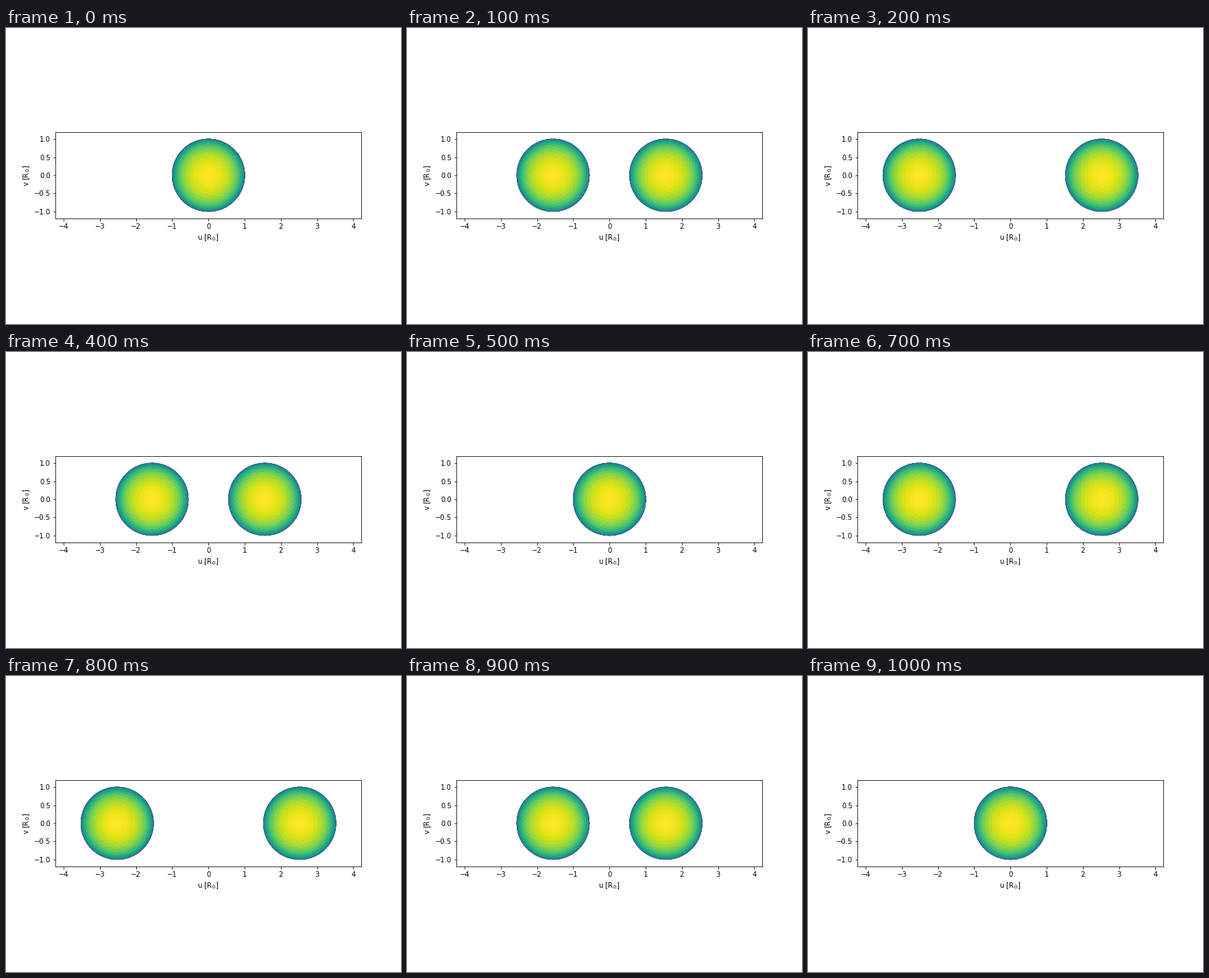
Animation of 576x432 px, one loop 1100 ms. Source, as a matplotlib script:

```python
import numpy as np
import matplotlib.pyplot as plt
from matplotlib.animation import FuncAnimation
from matplotlib.collections import PolyCollection

FRAMES = 11
ORBIT = 2.65   # distance of each star from the centre of mass
SPLIT = 9      # subdivisions per icosahedron edge


def icosahedron():
    """Faces of a unit icosahedron with its poles on the first axis."""
    def ring(height, shift):
        a = 2 * np.pi * (np.arange(5) + shift) / 5
        r = np.sqrt(1 - height**2)
        return np.column_stack([np.full(5, height), r * np.cos(a), r * np.sin(a)])

    h = 1 / np.sqrt(5)
    top, low = ring(h, 0), ring(-h, 0.5)
    north, south = np.array([1, 0, 0]), np.array([-1, 0, 0])
    faces = []
    for i in range(5):
        j = (i + 1) % 5
        faces += [(north, top[i], top[j]), (top[i], low[i], top[j]),
                  (low[i], low[j], top[j]), (south, low[j], low[i])]
    return faces


def sphere(n):
    tris = []
    for a, b, c in icosahedron():
        def point(i, j):
            p = a + (b - a) * i / n + (c - a) * j / n
            return p / np.linalg.norm(p)
        for i in range(n):
            for j in range(n - i):
                tris.append([point(i, j), point(i + 1, j), point(i, j + 1)])
                if i + j < n - 1:
                    tris.append([point(i + 1, j), point(i + 1, j + 1), point(i, j + 1)])
    return np.array(tris)


MESH = sphere(SPLIT)


def star(angle):
    """Mesh of one star, as (depth, u, v), turned with the orbit."""
    c, s = np.cos(angle), np.sin(angle)
    spin = np.array([[c, -s, 0], [s, c, 0], [0, 0, 1]])
    tris = MESH @ spin.T
    mid = tris.mean(axis=1)
    mu = mid[:, 0] / np.linalg.norm(mid, axis=1)
    light = 0.2 + 0.8 * np.clip(mu, 0, 1) ** 0.8   # limb darkening
    return tris + ORBIT * np.array([c, s, 0]), light


fig = plt.figure(figsize=(8, 6), dpi=72)
ax = fig.add_axes([0.125, 0.125, 0.775, 0.755])
ax.set_aspect("equal")
ax.set(xlim=(-4.228, 4.228), ylim=(-1.195, 1.195),
       xlabel=r"u [$\mathrm{R_{\odot}}$]", ylabel=r"v [$\mathrm{R_{\odot}}$]")
ax.set_xticks(range(-4, 5))
ax.set_yticks(np.arange(-1, 1.1, 0.5))

stars = PolyCollection([], cmap="viridis", edgecolors="face", linewidths=1)
stars.set_clim(0, 1)
ax.add_collection(stars, autolim=False)


def update(k):
    angle = 2 * np.pi * k / (FRAMES - 1)
    pair = [star(angle), star(angle + np.pi)]
    tris = np.concatenate([p[0] for p in pair])
    light = np.concatenate([p[1] for p in pair])
    order = np.argsort(tris[:, :, 0].mean(axis=1), kind="stable")
    stars.set_verts(tris[order][:, :, 1:])
    stars.set_array(light[order])
    return [stars]


anim = FuncAnimation(fig, update, frames=FRAMES, interval=100, repeat=True)
plt.show()
```
